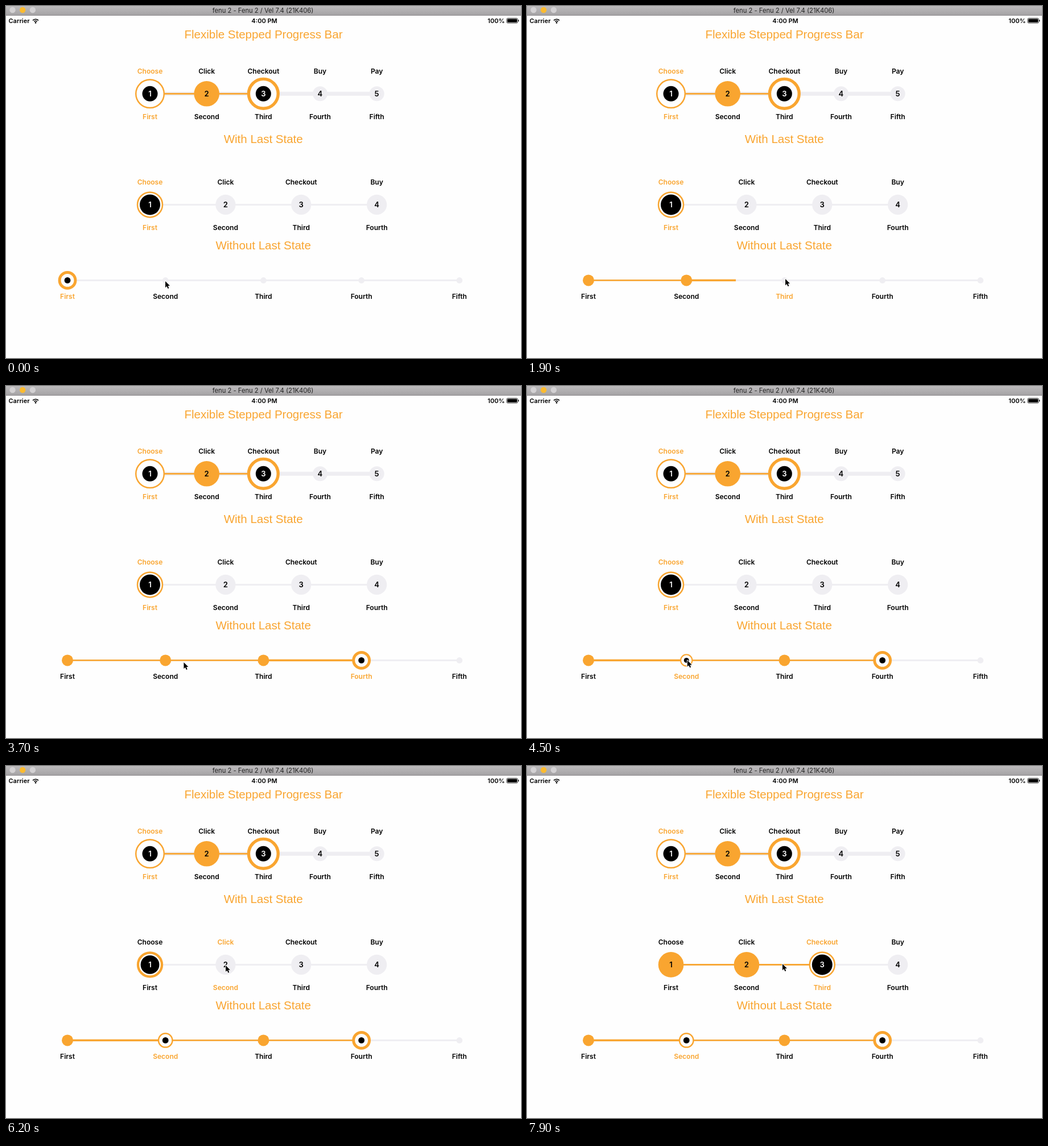
An HTML page with a canvas that plays this animation: 905x619 px, repeating every 8 s.

```html
<!DOCTYPE html>
<html lang="en">
<head>
<meta charset="utf-8">
<title>Stepped progress bars</title>
<style>
html, body { margin: 0; width: 100%; height: 100%; overflow: hidden; background: #fefefe; }
canvas { display: block; }
</style>
</head>
<body>
<canvas id="stage" width="905" height="619"></canvas>
<script>
const ctx = document.getElementById('stage').getContext('2d');
const LOOP = 8000, STEP = 400;
const ORANGE = '#f9a530', GREY = '#efeef2', BLACK = '#000', PAGE = '#fefefe';
const UI = 'Inter, Roboto, sans-serif';
const ORDINALS = ['First', 'Second', 'Third', 'Fourth', 'Fifth'];
const ACTIONS = ['Choose', 'Click', 'Checkout', 'Buy', 'Pay'];

// clicks: [time, selected index]; ring and back: [radius, line width]
const bars = [
  { x: 253, dx: 99.65, n: 5, y: 154.3, rail: 7, line: 2.8, hot: 2.8, grey: 13, done: 22.3, dot: 13.5,
    ring: [25.9, 5.4], back: [24.8, 2.5], full: true, clicks: [[-3000, 2], [-2000, 0]] },
  { x: 253, dx: 132.87, n: 4, y: 349.4, rail: 3, line: 2.8, hot: 2.8, grey: 17.6, done: 22.3, dot: 18,
    ring: [22, 2.5], back: [22, 2.5], full: true, clicks: [[-2000, 0], [6150, 1], [7400, 2]] },
  { x: 108, dx: 172.2, n: 5, y: 482.4, rail: 3, line: 2.6, hot: 3.5, grey: 5.3, done: 10, dot: 5.4,
    ring: [13.9, 5], back: [12.2, 2.5], full: false,
    clicks: [[-2000, 0], [300, 1], [1700, 2], [2850, 3], [4450, 1]] }
];

// time, x, y of the pointer tip
const pointerPath = [
  [0, 280, 484], [700, 280, 484], [1100, 430, 479], [1300, 454, 480], [2100, 454, 480],
  [2500, 618, 481], [2700, 625, 481], [3250, 625, 482], [3700, 312.5, 486], [4000, 283, 483],
  [4800, 281, 482], [5200, 284, 459.5], [5900, 386, 352], [6350, 386, 350], [6850, 519, 347],
  [7550, 519, 347], [7900, 449, 348], [8000, 436, 350]
];

const clamp = v => Math.max(0, Math.min(1, v));
const mix = (a, b, k) => a + (b - a) * k;
const smooth = k => k * k * (3 - 2 * k);

function disc(x, y, r, color) {
  ctx.fillStyle = color;
  ctx.beginPath();
  ctx.arc(x, y, r, 0, 2 * Math.PI);
  ctx.fill();
}

function arc(x, y, r, width, color, from = 0, to = 2 * Math.PI) {
  ctx.strokeStyle = color;
  ctx.lineWidth = width;
  ctx.beginPath();
  ctx.arc(x, y, r, from, to);
  ctx.stroke();
}

function rail(x1, x2, y, h, color) {
  ctx.fillStyle = color;
  ctx.fillRect(x1, y - h / 2, x2 - x1, h);
}

function text(s, x, y, font, color = BLACK, align = 'center') {
  ctx.font = font;
  ctx.fillStyle = color;
  ctx.textAlign = align;
  ctx.fillText(s, x, y);
}

function ringNode(x, y, [r, w], dot, k) {
  disc(x, y, r * k, PAGE);
  arc(x, y, r * k, w * k, ORANGE);
  disc(x, y, dot * k, BLACK);
}

function drawBar(b, t) {
  const at = i => b.x + b.dx * i;
  const past = b.clicks.filter(c => c[0] <= t);
  const [when, cur] = past[past.length - 1];
  const before = past.slice(0, -1);
  const prev = before.length ? before[before.length - 1][1] : cur;
  const oldMax = Math.max(0, ...before.map(c => c[1]));
  const max = Math.max(oldMax, cur);
  const p = smooth(clamp((t - when) / STEP));
  const shrink = clamp(2 * p), grow = clamp(2 * p - 1);
  const forward = cur > prev;

  rail(at(0), at(b.n - 1), b.y, b.rail, GREY);
  for (let i = 0; i < max; i++) {
    const end = forward && i >= oldMax ? mix(at(i), at(i + 1), p) : at(i + 1);
    rail(at(i), end, b.y, i === cur - 1 ? b.hot : b.line, ORANGE);
  }

  for (let i = 0; i < b.n; i++) {
    const x = at(i);
    const isCur = i === cur, isMax = i === max;
    const leaving = i === prev && prev !== cur && !isMax;
    let dark = false;
    if (isMax) {
      const k = isCur && forward ? grow : 1;
      if (k < 0.5) disc(x, b.y, b.grey, GREY);
      if (k > 0) ringNode(x, b.y, b.ring, b.dot, k);
      dark = k > 0.5;
    } else if (i > max) {
      disc(x, b.y, b.grey, GREY);
    } else {
      disc(x, b.y, b.done, ORANGE);
      if (isCur) {
        ringNode(x, b.y, b.back, b.dot, mix(b.done / b.back[0], 1, p));
        dark = true;
      } else if (leaving && shrink < 1) {
        const [r, w] = b.ring;
        ringNode(x, b.y, [mix(r, b.done / 2, shrink), mix(w, b.done, shrink)], b.dot * (1 - shrink), 1);
        dark = shrink < 0.5;
      }
    }
    const color = isCur ? ORANGE : BLACK;
    const label = '600 12px ' + UI;
    if (b.full) {
      text(i + 1, x, b.y + 4.6, '600 13px ' + UI, dark ? '#fff' : BLACK);
      text(ACTIONS[i], x, b.y - 35.4, label, color);
      text(ORDINALS[i], x, b.y + 44.6, label, color);
    } else {
      text(ORDINALS[i], x, b.y + 32.2, label, color);
    }
  }
}

function drawChrome() {
  const g = ctx.createLinearGradient(0, 0, 0, 17);
  g.addColorStop(0, '#bdbbbd');
  g.addColorStop(1, '#a3a1a3');
  ctx.fillStyle = g;
  ctx.fillRect(0, 0, 905, 17);
  ctx.fillStyle = '#8f8d8f';
  ctx.fillRect(0, 16, 905, 1);
  ['#d3d1d3', '#fbbb30', '#d3d1d3'].forEach((c, i) => disc(11.5 + 17.7 * i, 7, 5.2, c));
  text('fenu 2 - Fenu 2 / Vel 7.4 (21K406)', 451.5, 11.5, '400 11.2px ' + UI, '#222');

  const status = '600 11px ' + UI;
  text('Carrier', 4.5, 30, status, BLACK, 'left');
  text('4:00 PM', 454, 30, status);
  text('100%', 876.5, 30, status, BLACK, 'right');
  for (const r of [3.6, 6.8]) arc(52, 30, r, 1.6, BLACK, -Math.PI * 0.76, -Math.PI * 0.24);
  disc(52, 29.4, 1.3, BLACK);

  ctx.strokeStyle = BLACK;
  ctx.lineWidth = 0.8;
  ctx.beginPath();
  ctx.roundRect(879.8, 21.6, 19.4, 8.4, 2);
  ctx.stroke();
  ctx.fillStyle = BLACK;
  ctx.beginPath();
  ctx.roundRect(881, 22.8, 17, 6, 1);
  ctx.fill();
  ctx.fillRect(900, 24.4, 1.2, 2.8);

  const heading = '20.5px "Liberation Sans", Arial, sans-serif';
  text('Flexible Stepped Progress Bar', 452.5, 57, heading, ORANGE);
  text('With Last State', 452.2, 240.5, heading, ORANGE);
  text('Without Last State', 452.2, 427.7, heading, ORANGE);
}

function drawPointer(t) {
  const j = pointerPath.findIndex(k => k[0] > t);
  const a = pointerPath[j - 1], b = pointerPath[j];
  const k = (t - a[0]) / (b[0] - a[0]);
  ctx.save();
  ctx.translate(mix(a[1], b[1], k), mix(a[2], b[2], k));
  const shape = new Path2D('M0 0V11.2L2.6 8.8L4.4 13L6.3 12.2L4.6 8.1H8Z');
  ctx.strokeStyle = '#fff';
  ctx.lineWidth = 1.8;
  ctx.lineJoin = 'round';
  ctx.stroke(shape);
  ctx.fillStyle = BLACK;
  ctx.fill(shape);
  ctx.restore();
}

function render(t) {
  ctx.fillStyle = PAGE;
  ctx.fillRect(0, 0, 905, 619);
  drawChrome();
  bars.forEach(b => drawBar(b, t));
  drawPointer(t);
}

const start = performance.now();
function frame() {
  render((performance.now() - start) % LOOP);
  requestAnimationFrame(frame);
}
frame();
</script>
</body>
</html>
```
